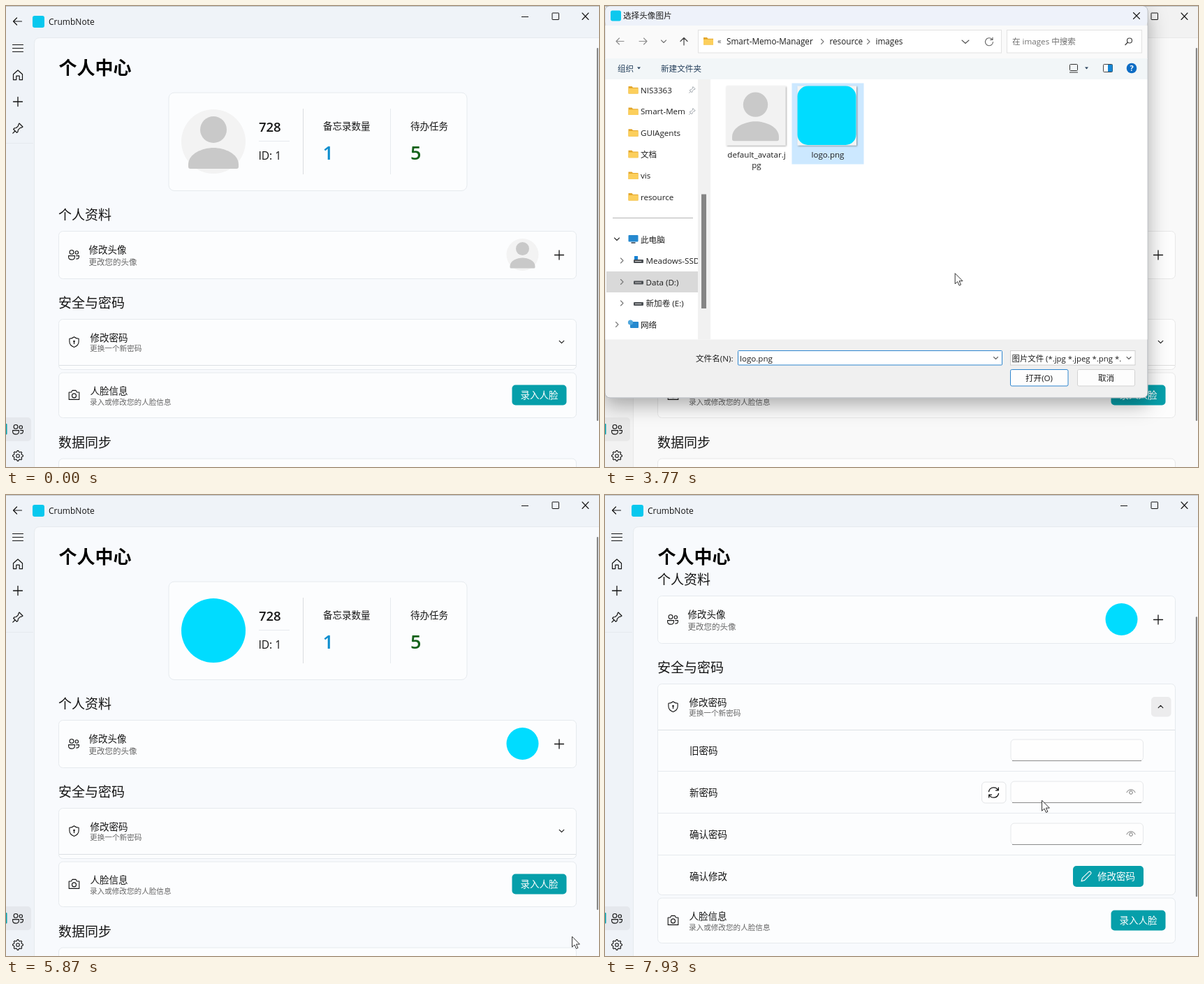
Animation of 849 by 660 pixels, one loop 8000 ms. Source, as an HTML page:

```html
<!DOCTYPE html>
<html lang="zh-CN">
<head>
<meta charset="utf-8">
<title>个人中心</title>
<style>
  html, body { margin: 0; width: 100%; height: 100%; overflow: hidden; background: #f2f2f2; }
  svg { display: block; width: 849px; height: 660px; }
  text { font-family: "Open Sans", "Noto Sans CJK SC", "Noto Sans CJK", sans-serif; white-space: pre; }
</style>
</head>
<body>
<svg id="stage" viewBox="0 0 849 660" xmlns="http://www.w3.org/2000/svg"></svg>
<script>
const LOOP = 8000, GROW = 230;
const CYAN = '#00dcff', TEAL = '#069faa', INK = '#151515', GREY = '#666';

// Drawing helpers
const T = (x, cy, size, str, fill = INK, extra = '') =>
  `<text x="${x}" y="${cy + size * 0.37}" font-size="${size}" fill="${fill}" ${extra}>${str}</text>`;
const R = (x, y, w, h, r, fill, stroke = 'none', extra = '') =>
  `<rect x="${x}" y="${y}" width="${w}" height="${h}" rx="${r}" fill="${fill}" stroke="${stroke}" ${extra}/>`;
const P = (d, stroke = INK, w = 1.1, fill = 'none') =>
  `<path d="${d}" stroke="${stroke}" stroke-width="${w}" fill="${fill}" stroke-linecap="round" stroke-linejoin="round"/>`;
const C = (x, y, r, fill, stroke = 'none', w = 1.1) =>
  `<circle cx="${x}" cy="${y}" r="${r}" fill="${fill}" stroke="${stroke}" stroke-width="${w}"/>`;
const at = (x, y, body, s = 1, extra = '') => `<g transform="translate(${x} ${y}) scale(${s})" ${extra}>${body}</g>`;
const G = (id, body, extra = '') => `<g id="${id}" ${extra}>${body}</g>`;
const line = (x1, y1, x2, y2, stroke = 'var(--edge)') =>
  `<path d="M${x1} ${y1}L${x2} ${y2}" stroke="${stroke}" fill="none"/>`;
const mid = 'text-anchor="middle"';
const card = (y, h, x = 75.5, w = 741) => R(x, y, w, h, 6, 'var(--card)', 'var(--edge)');

// Icons, centred on 0,0
const plus = P('M-6.5 0H6.5M0-6.5V6.5', INK, 1.3);
const people = C(-3, -3.6, 2.9, 'none', INK) + C(4.3, -3, 2.2, 'none', INK) +
  P('M-7.4 1.6H1.4v1.6c0 2.8-1.8 3.9-4.4 3.9s-4.4-1.1-4.4-3.9zM3.6 1.6h3.9v1.2c0 2.5-1.5 3.5-4 3.2');
const home = P('M-6.5-1.2L0-7l6.5 5.8V6.7H2.2V1.2h-4.4v5.5h-4.3z', INK, 1.2);
const pin = P('M2-7L7-2 5.4-.9 3.4-.6 .4 2.4 0 5-1.5 6.3-6.3 1.5-5-.1-2.4-.5 .6-3.4 .9-5.4zM-4 4L-7.2 7.2', INK, 1.2);
const gearPts = [...Array(32).keys()].map(i => {
  const r = i % 4 < 2 ? 7.4 : 5.7, a = (i - 0.5) * Math.PI / 16;
  return (r * Math.cos(a)).toFixed(1) + ' ' + (r * Math.sin(a)).toFixed(1);
});
const gear = P('M' + gearPts.join('L') + 'z') + C(0, 0, 2.3, 'none', INK);
const shield = P('M0-7.3C2-5.7 4.2-4.9 6.6-4.7V-.4C6.6 3.6 4 6 0 7.5-4 6-6.6 3.6-6.6-.4V-4.7C-4.2-4.9-2-5.7 0-7.3z') +
  C(0, -1, 1.3, INK) + P('M0 0V2.6', INK, 1.2);
const camera = P('M-7.3-4h3.2l1.5-2.6h5.2L4.1-4h3.2v10.4H-7.3z') + C(0, 0.9, 3, 'none', INK);
const cloud = P('M-4 4.5C-8.6 4.5-8.8-1-4.6-1.2-4-6.4 4-6.4 4.6-1.2 8.8-1 8.6 4.5 4 4.5z');
const eye = P('M-6 .8C-4-4.6 4-4.6 6 .8', '#777', 1) + C(0, 1, 2.3, 'none', '#777', 1);
const refresh = P('M-7-1.5A7.2 7.2 0 0 1 6.3-3.5M6.8-7V-3.2H3M7 1.5A7.2 7.2 0 0 1-6.3 3.5M-6.8 7V3.2H-3', INK, 1.3);
const pencil = P('M-7 7L-5.6 2.4 3.7-6.6C5.5-8 8-5.500 6.6-3.7L-2.4 5.600z', '#fff', 1.1);
const folder = `<path d="M-7-5h5l1.500 1.700H7V5.500H-7z" fill="#e3a62b"/>` + R(-7, -2.3, 14, 7.8, 1, '#fccf5b');
const drive = R(-7, -1, 14, 5, 1, '#4c4f53') + R(-5, 1, 9, 1, 0, '#ccc');
const chevron = P('M-3.300-1.600L0 1.700 3.300-1.600');
const logo = R(-8.5, -8.5, 17, 17, 3, '#08c8ee');

const person = C(0, -17, 19, '#c9c9c9') +
  `<path d="M-36 36V33C-36 17-15 9 0 9S36 17 36 33V36Q36 39 33 39H-33Q-36 39-36 36z" fill="#c9c9c9"/>`;
const avatar = (x, y, s) =>
  at(x, y, `<g class="old">${C(0, 0, 46, '#f3f3f3')}${person}</g><g class="new">${C(0, 0, 46, CYAN)}</g>`, s);

function shell() {
  return R(0, 0, 849, 660, 0, 'var(--side)') + line(0, 0.5, 849, 0.5, '#bfc4c9') +
    P('M22.500 22H10.500M15.500 17L10.500 22 15.500 27', INK, 1.2) +
    at(46.5, 22.5, logo) + T(61, 23, 12, 'CrumbNote') +
    line(738, 15.5, 748, 15.5, INK) + R(782, 10, 9.5, 9.5, 0.5, 'none', INK) +
    P('M825 10L834 19.500M834 10L825 19.500') +
    P('M9.500 55.500H24.500M9.500 60.500H24.500M9.500 65.500H24.500') +
    at(17, 99, home) + at(17, 137, plus) + at(17, 175, pin) + line(0, 196.5, 39, 196.5) +
    R(-4, 589, 40, 34, 5, 'var(--pick)') + R(-1, 598, 2.5, 15.5, 1, TEAL) +
    at(17, 606, people) + at(17, 644, gear) +
    `<path d="M40.500 661V53.500q0-8 8-8H850V661z" fill="var(--page)" stroke="var(--edge)"/>` +
    T(75.5, 88, 26, '个人中心', '#000', 'font-weight="700"');
}

function profile() {
  return R(233, 124, 427, 140.5, 8, 'var(--card)', 'var(--edge)') + avatar(297, 194, 1) +
    T(362, 173.5, 18.5, '728', INK, 'font-weight="600"') + line(362, 193.5, 406, 193.5) +
    T(361.5, 214.5, 15.5, 'ID: 1') + line(425.5, 147, 425.5, 241, '#dadcdf') + line(550.5, 147, 550.5, 241) +
    T(454, 172.5, 13.5, '备忘录数量') + T(453.5, 210.5, 27, '1', '#0b8dce', 'font-weight="600"') +
    T(579, 172.5, 13.5, '待办任务') + T(579, 210.5, 27, '5', '#14621a', 'font-weight="600"') +
    T(75, 299, 19, '个人资料') + card(322.5, 68) + at(97, 356, people) +
    T(118.5, 349.5, 13.5, '修改头像') + T(118.5, 366.5, 11.5, '更改您的头像', GREY) +
    avatar(739.5, 356, 0.5) + R(777, 341, 30, 30.5, 5, '#f1f1f1', 'none', 'id="plusHover"') + at(792, 356.5, plus);
}

function field(y, withEye) {
  return R(581, y, 189.5, 30.5, 5, '#fefefe', '#e6e8ea') + line(583, y + 30.5, 768, y + 30.5, '#8b8b8b') +
    (withEye ? at(753, y + 15, eye) : '');
}

function password() {
  const rows = ['旧密码', '新密码', '确认密码', '确认修改']
    .map((s, i) => T(121, 544.5 + 60 * i, 13.5, s) + (i ? line(76, 513.5 + 60 * i, 816, 513.5 + 60 * i) : '')).join('');
  const form = rows + field(528, false) + field(588, true) + field(648, true) +
    R(539.5, 589, 34.5, 30, 5, '#fefefe', '#e3e5e7') + at(556.5, 604, refresh) +
    R(670, 709, 101, 30, 5, TEAL) + at(689, 724, pencil) + T(705, 724, 13.5, '修改密码', '#fff');
  return T(75, 425, 19, '安全与密码') +
    R(75.5, 448.5, 741, 72, 6, 'var(--card)', 'var(--edge)', 'id="passCard"') +
    `<g clip-path="url(#formClip)">${G('form', form)}</g>` + line(76, 514.5, 816, 514.5, 'var(--edge2)') +
    at(97.5, 481, shield) + T(120.5, 475, 13.5, '修改密码') + T(120, 490.5, 10.65, '更换一个新密码', GREY) +
    R(782, 467, 28.5, 28.5, 5, '#ececed', 'none', 'id="openHover"') + G('chev', chevron);
}

function rest() {
  return card(525, 64.5) + at(97.5, 557, camera) + T(120.5, 551.5, 13.5, '人脸信息') +
    T(120, 566.8, 10.6, '录入或修改您的人脸信息', GREY) +
    R(724.5, 542.5, 78, 29, 5, TEAL) + T(736.5, 557.5, 13.5, '录入人脸', '#fff') +
    T(75, 624.5, 19, '数据同步') + card(648, 68.5) + at(97, 680, cloud) +
    T(118.5, 674, 13.5, '云端同步') + T(118.5, 691.5, 11.5, '同步您的备忘录数据到云端', GREY) +
    [765, 771, 777].map(x => C(x, 681, 1.6, INK)).join('') + at(791, 681.5, chevron);
}

function dialog() {
  const dark = '#1d1d1d', navy = '#26405c', S = 11.6;
  const quick = ['NIS3363', 'Smart-Mem', 'GUIAgents', '文档', 'vis', 'resource']
    .map((s, i) => at(40.5, 120 + 30.6 * i, folder) + T(51, 120.5 + 30.6 * i, S, s, dark)).join('');
  const pins = [120, 151].map(y => at(125, y, pin.replaceAll(INK, '#7b838c'), 0.6)).join('');
  const right = (x, y) => P(`M${x - 1.500} ${y - 3.500}l3.500 3.500-3.500 3.500`, '#777');
  const tri = (x, y) => `<path d="M${x - 2.500} ${y - 1}h5l-2.500 3z" fill="${navy}"/>`;
  const top = R(0, 0, 777, 561, 7, '#f0f0f0', '#a9adb3') + R(0.5, 0.5, 776, 28, 6, '#eef2fa') +
    at(15.5, 14, logo, 0.88) + T(26, 14, S, '选择头像图片', dark) + P('M756.500 9.500L765.500 18.500M765.500 9.500L756.500 18.500') +
    R(0.5, 28, 776, 48, 0, '#fafafa') +
    P('M27 50.500H16M20.500 46L16 50.500 20.500 55M49 50.500H60M55.500 46L60 50.500 55.500 55', '#8d8d8d') +
    P('M80.500 49l3.500 3.500 3.500-3.500', '#777') + P('M113 56V45.500M108 50.500L113 45.500 118 50.500', '#444', 1.2) +
    R(133.5, 34.5, 434, 32.5, 0, '#fff', '#e2e2e2') + at(148, 50, folder) + T(161, 50, 11, '«', '#555') +
    T(174, 50.5, 11.7, 'Smart-Memo-Manager', dark) + right(311, 51) + T(321.5, 50.5, 11.7, 'resource', dark) +
    right(377, 51) + T(387.5, 50.5, 11.7, 'images', dark) + P('M511 49l5 4.500 5-4.500', '#555') +
    P('M554 47.500A5.500 5.500 0 1 0 555.500 51.500M555 45V48.500H551.500', '#666') +
    R(575.5, 34.5, 193, 32.5, 0, '#fff', '#e2e2e2') + T(583, 51, S, '在 images 中搜索', '#707070') +
    C(751, 49.5, 3.5, 'none', '#444', 1.2) + P('M748.500 52L745 55.500', '#444', 1.5) +
    R(0.5, 75, 776, 30, 0, '#f2f6f8') + T(18, 89.5, S, '组织', navy) + tri(48.5, 88.5) + T(80, 89.5, S, '新建文件夹', navy) +
    R(665.5, 83.5, 11, 9, 1, 'none', '#333') + line(665, 95, 677, 95, '#333') + tri(689.5, 88.5) +
    R(713.5, 83.5, 13, 11, 1, '#fff', '#444') + R(720, 84, 6.5, 10, 0, '#1487d6') +
    C(754, 89, 7.3, '#0b6cc4') + T(754, 89, 11, '?', '#fff', mid + ' font-weight="700"');
  const tree = R(0.5, 105, 776, 372.5, 0, '#fff') + R(133, 105, 18, 372.5, 0, '#f1f1f1') + R(138, 269.5, 7, 163.5, 0, '#858585') +
    quick + pins + line(11, 303.5, 126, 303.5, '#b5b5b5') +
    P('M13.500 332l3.500 3.500 3.500-3.500', '#333') + R(33.5, 328, 14, 9.5, 1, '#2589cf') + R(37.5, 338, 6, 2, 0, '#5d6b78') +
    T(51, 334.5, S, '此电脑', dark) + right(24, 364.5) + at(48, 364, drive + R(-6, -6, 5, 5, 0, '#1682d4')) +
    `<g clip-path="url(#treeClip)">${T(58.5, 364.5, S, 'Meadows-SSD', dark)}</g>` +
    R(2, 380, 131, 30, 0, '#d9d9d9') + right(24, 395) + at(48, 394.5, drive) + T(58.5, 395.5, S, 'Data (D:)', dark) +
    right(24, 425.5) + at(48, 425, drive) + T(58.5, 426, S, '新加卷 (E:)', dark) +
    right(17, 456) + R(36, 452, 12, 9, 1, '#2589cf') + C(36.5, 453, 3.6, '#4fa7dd') + T(51, 456.5, S, '网络', dark);
  const thumbShadow = 'filter="url(#thumbShade)"';
  const files = R(267.5, 110.5, 103, 116, 0, '#e5f3ff', 'none', 'id="pickBox"') +
    R(173.5, 114.5, 85, 85, 0, '#f2f2f2', 'none', thumbShadow) + at(215.5, 157, person, 0.93) +
    R(275.5, 114.5, 84.5, 85, 0, '#f4f4f4', 'none', thumbShadow) + R(275.5, 114.5, 84, 84.5, 15, CYAN) +
    T(217, 212.5, S, 'default_avatar.j', dark, mid) + T(217, 228, S, 'pg', dark, mid) + T(319, 212.5, S, 'logo.png', dark, mid);
  const foot = T(130, 504.5, S, '文件名(N):', dark) + R(190.5, 493.5, 378, 20.5, 1, '#fff', '#2f86cf') +
    R(192, 496, 1, 15, 0, '#000', 'none', 'id="caret"') + G('fileName', T(193, 504.5, S, 'logo.png', dark)) +
    P('M556.500 502.500l3 3 3-3', '#666') +
    R(580.5, 493.5, 178.5, 20.5, 0, '#fff', '#d0d0d0') + T(582.5, 504.5, 11.4, '图片文件 (*.jpg *.jpeg *.png *.', dark) +
    P('M747 502.500l3 3 3-3', '#666') +
    R(580.5, 520.5, 82.5, 23.5, 2, '#fdfdfd', '#2f86cf', 'id="okBtn"') + T(621.5, 532.5, S, '打开(O)', dark, mid) +
    R(676.5, 520.5, 82, 23.5, 2, '#fdfdfd', '#d3d3d3') + T(717.5, 532.5, S, '取消', dark, mid);
  return top + tree + files + foot;
}

const stage = document.getElementById('stage');
stage.innerHTML = `<defs>
  <clipPath id="pageClip"><rect x="41" y="103.500" width="808" height="557"/></clipPath>
  <clipPath id="formClip"><rect id="formBox" x="75" y="515" width="742" height="5"/></clipPath>
  <clipPath id="treeClip"><rect x="0" y="340" width="133" height="50"/></clipPath>
  <filter id="shade" x="-15%" y="-15%" width="130%" height="135%"><feDropShadow dx="0" dy="10" stdDeviation="14" flood-opacity=".32"/></filter>
  <filter id="thumbShade"><feDropShadow dx="1" dy="1" stdDeviation="1" flood-opacity=".4"/></filter>
</defs>` + shell() +
  `<g clip-path="url(#pageClip)">${G('scroll', profile() + password() + G('below', rest()))}</g>` +
  R(845.8, 60, 2.2, 534, 1, '#868686', 'none', 'id="thumb"') +
  G('dialog', dialog(), 'filter="url(#shade)"') +
  G('cursor', P('M.500 .500V15.200L4 12 6.500 17.500 8.900 16.400 6.400 11.100H11z', '#333', 1, '#fff'));

const $ = Object.fromEntries([...stage.querySelectorAll('[id]')].map(e => [e.id, e]));
const olds = stage.querySelectorAll('.old'), news = stage.querySelectorAll('.new');

// Pointer track: time, x, y
const track = [
  [70, 815, 634], [480, 626, 372], [1280, 626, 372], [1620, 725, 336], [1880, 785, 348], [2420, 785, 348],
  [2950, 441, 218], [3230, 322, 165], [3370, 322, 165], [4050, 625, 534], [4400, 625, 534], [4800, 510, 425],
  [5210, 510, 425], [5560, 700, 560], [5790, 817, 639], [5870, 810, 632], [6010, 810, 632], [6210, 608, 479],
  [6760, 608, 479], [6960, 731, 439], [7080, 731, 437], [7300, 731, 437], [7650, 625, 437], [LOOP, 625, 437]
];

const ramp = (t, a, b) => Math.min(1, Math.max(0, (t - a) / (b - a)));
const out = u => 1 - (1 - u) ** 2;
const mix = (a, b, u) => a + (b - a) * u;
const show = (el, on) => el.style.display = on ? '' : 'none';

function pointer(t) {
  const i = Math.max(1, track.findIndex(k => k[0] >= t));
  const [a, b] = [track[i - 1], track[i]], u = ramp(t, a[0], b[0]);
  return [mix(a[1], b[1], u), mix(a[2], b[2], u)];
}

// Window tints: inactive to active
const tints = {
  side: [[242, 242, 242], [239, 243, 248]], page: [[249, 249, 249], [248, 250, 253]],
  card: [[253, 253, 253], [252, 253, 254]], edge: [[232, 232, 232], [230, 234, 238]],
  edge2: [[222, 222, 222], [220, 224, 228]], pick: [[232, 232, 232], [229, 232, 237]]
};

function draw(t) {
  const active = 1 - ramp(t, 2080, 2270) + ramp(t, 4400, 4700);
  for (const [name, [off, on]] of Object.entries(tints))
    stage.style.setProperty('--' + name, `rgb(${off.map((v, i) => mix(v, on[i], active).toFixed(1))})`);

  const p = out(ramp(t, 7120, 7320)), grow = GROW * p;
  const y = 69 * out(ramp(t, 6360, 6490)) + 109 * out(ramp(t, 7785, 7930));
  $.scroll.setAttribute('transform', `translate(0 ${-y})`);
  $.below.setAttribute('transform', `translate(0 ${grow})`);
  $.form.setAttribute('transform', `translate(0 ${grow - GROW})`);
  $.formBox.setAttribute('height', 5 + grow);
  $.passCard.setAttribute('height', 72 + grow);
  $.chev.setAttribute('transform', `translate(795.5 481) rotate(${180 * p})`);
  const len = mix(534, 401, p);
  $.thumb.setAttribute('height', len);
  $.thumb.setAttribute('y', 60 + (593 - len) * y / (69 + grow));

  show($.plusHover, t >= 1780 && t < 2480);
  show($.openHover, t >= 6930);
  const swapped = t >= 4480;
  olds.forEach(e => show(e, !swapped));
  news.forEach(e => show(e, swapped));

  const fade = out(ramp(t, 2440, 2640)) * (1 - ramp(t, 4060, 4190));
  const s = mix(0.92, 1, fade);
  show($.dialog, fade > 0);
  $.dialog.setAttribute('opacity', fade);
  $.dialog.setAttribute('transform', `translate(${388 * (1 - s)} ${280 * (1 - s)}) scale(${s})`);
  const picked = t >= 3330;
  show($.pickBox, t >= 3080);
  $.pickBox.setAttribute('fill', picked ? '#cce8ff' : '#e5f3ff');
  show($.fileName, picked);
  show($.caret, !picked && (t - 2700) % 1060 < 530);
  $.okBtn.setAttribute('fill', t >= 3980 ? '#e3f0fb' : '#fdfdfd');

  show($.cursor, t >= 70);
  $.cursor.setAttribute('transform', `translate(${pointer(t)})`);
}

function tick() {
  draw(performance.now() % LOOP);
  requestAnimationFrame(tick);
}
tick();
</script>
</body>
</html>
```
